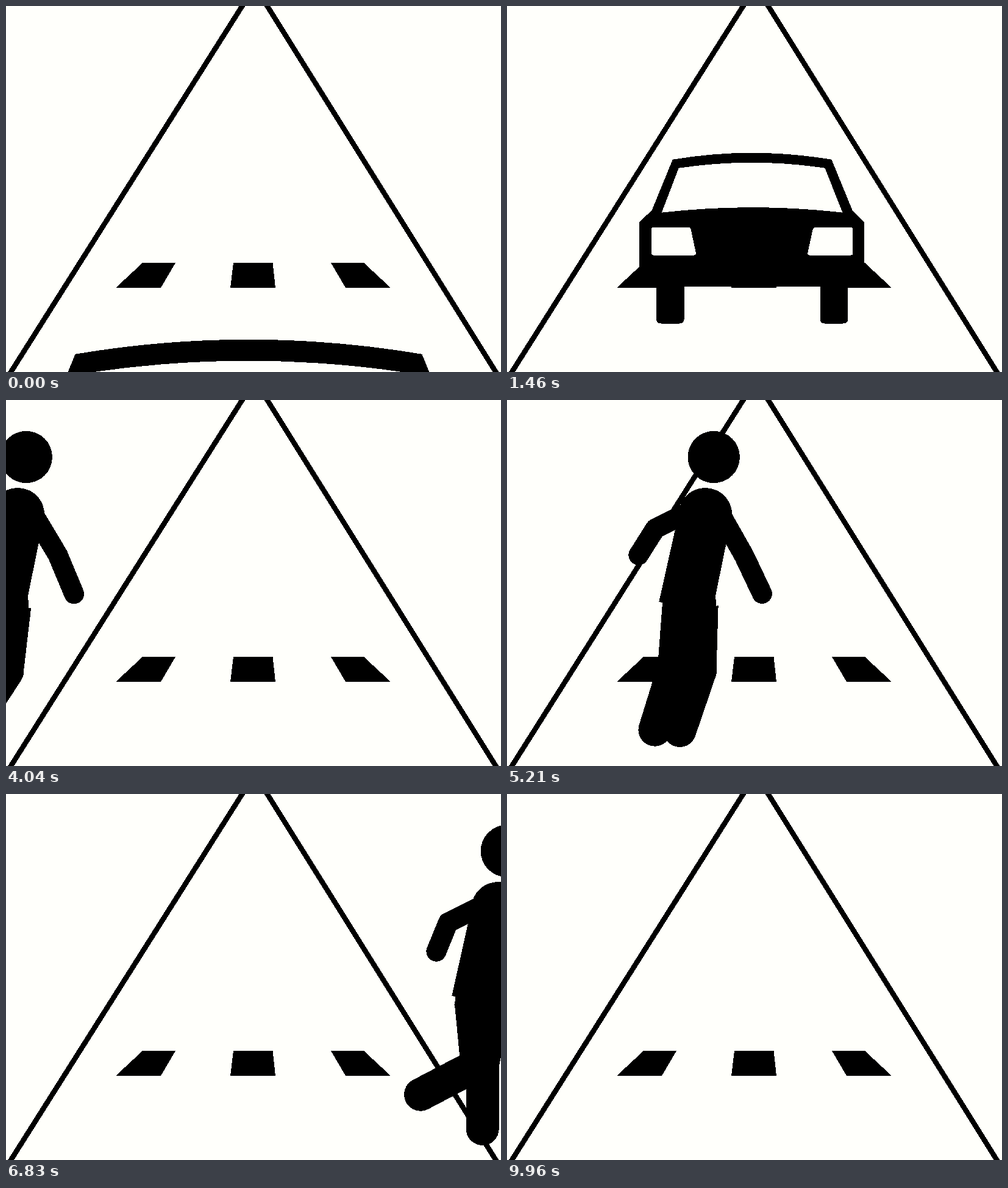
An HTML page that plays this animation: 812x600 px, repeating every 10 s.

```html
<!DOCTYPE html>
<html lang="en">
<head>
<meta charset="utf-8">
<title>Crosswalk</title>
<style>
  html, body { margin: 0; width: 100%; height: 100%; overflow: hidden; background: #fffffb; }
  svg { display: block; width: 812px; height: 600px; shape-rendering: crispEdges; }
  .line { fill: none; stroke: #000; stroke-width: 8.5; }
  .limb { fill: none; stroke: #000; stroke-linecap: round; stroke-linejoin: round; }
</style>
</head>
<body>
<svg viewBox="0 0 812 600">
  <path class="line" d="M393.8 -10L1.7 610M422.2 -10L809.8 610"/>
  <path d="M224 421H278L254 462H180ZM373 421H437.5L442 462H368ZM533 421H587L631 462H557Z"/>

  <g id="car">
    <path fill-rule="evenodd" d="
      M-130 11Q0 -11 131 11L165 94L185 114V207L175 219H-175L-185 207V114L-164 94Z
      M-120 25L-148 98Q0 81 149 98L120 25Q0 7 -120 25Z
      M-161 122H-105Q-101 122 -100 126L-92 163Q-91 168 -95 168H-161Q-165 168 -165 164V126Q-165 122 -161 122Z
      M162 122H105Q101 122 100 126L92 163Q91 168 95 168H162Q166 168 166 164V126Q166 122 162 122Z"/>
    <path d="M-157 217H-111V272Q-111 280 -119 280H-149Q-157 280 -157 272Z
      M112 217H158V272Q158 280 150 280H120Q112 280 112 272Z"/>
  </g>

  <g id="walker">
    <circle cy="93.5" r="42.7"/>
    <path d="M-90 331L-58 188A44 44 0 0 1 30 188L3 320L4 350H-84V332Z"/>
    <path id="arms" class="limb" stroke-width="33"/>
    <path id="thighs"/>
    <path id="shins" class="limb" stroke-width="54"/>
  </g>
</svg>
<script>
const LOOP = 10000, STEP_PERIOD = 1140, MID_WALK = 5210;
const SHOULDER = [-2, 164], HIP = [-39, 345];
const HIP_R = 47, KNEE_R = 27;
const $ = id => document.getElementById(id);
const rad = deg => deg * Math.PI / 180;
const wave = deg => Math.cos(rad(deg));

// Point at a distance; the angle is measured from straight down, forward positive
const reach = ([x, y], deg, len) => [x + len * Math.sin(rad(deg)), y + len * wave(deg)];

// phase 0: leg under the body and moving forward
function leg(phase) {
  const thigh = 32 * wave(phase - 90) - 3;
  const bend = 75 * ((1 + wave(phase - 320)) / 2) ** 3;
  const knee = reach(HIP, thigh, 100);
  const foot = reach(knee, thigh - bend, 104);
  const side = (p, r) => reach(p, thigh + 90, r);
  const outline = [side(HIP, HIP_R), side(knee, KNEE_R), side(knee, -KNEE_R), side(HIP, -HIP_R)];
  return { thigh: `M${outline.join('L')}Z`, shin: `M${knee}L${foot}` };
}

// phase 0: arm at its foremost; the forearm lags behind
function arm(phase) {
  const elbow = reach(SHOULDER, 48 * wave(phase) - 17, 105);
  const hand = reach(elbow, 32 * wave(phase - 40) - 3.5, 60 + 9 * wave(phase));
  return `M${SHOULDER}L${elbow}L${hand}`;
}

function drawCar(t) {
  const s = 2.18 - .000792 * t + .047 * Math.sin(2 * Math.PI * t / 2500);
  const y = 241 + 279.8 * (s - 1) - 17.4 * (s - 1) ** 2;
  $('car').style.display = s > .02 ? '' : 'none';
  $('car').setAttribute('transform', `translate(${405.6 - 4 * s} ${y}) scale(${s})`);
}

function drawWalker(t) {
  const u = t - MID_WALK;
  const x = 339 + .27664 * u + .0000129 * u * u;
  const phase = 203 + 360 * u / STEP_PERIOD;
  const sides = [phase, phase + 180];
  const legs = sides.map(leg);
  $('walker').setAttribute('transform', `translate(${x} 0)`);
  $('arms').setAttribute('d', sides.map(p => arm(p - 189)).join(''));
  $('thighs').setAttribute('d', legs.map(l => l.thigh).join(''));
  $('shins').setAttribute('d', legs.map(l => l.shin).join(''));
}

const start = performance.now();
function frame() {
  const t = (performance.now() - start) % LOOP;
  drawCar(t);
  drawWalker(t);
  requestAnimationFrame(frame);
}
frame();
</script>
</body>
</html>
```
